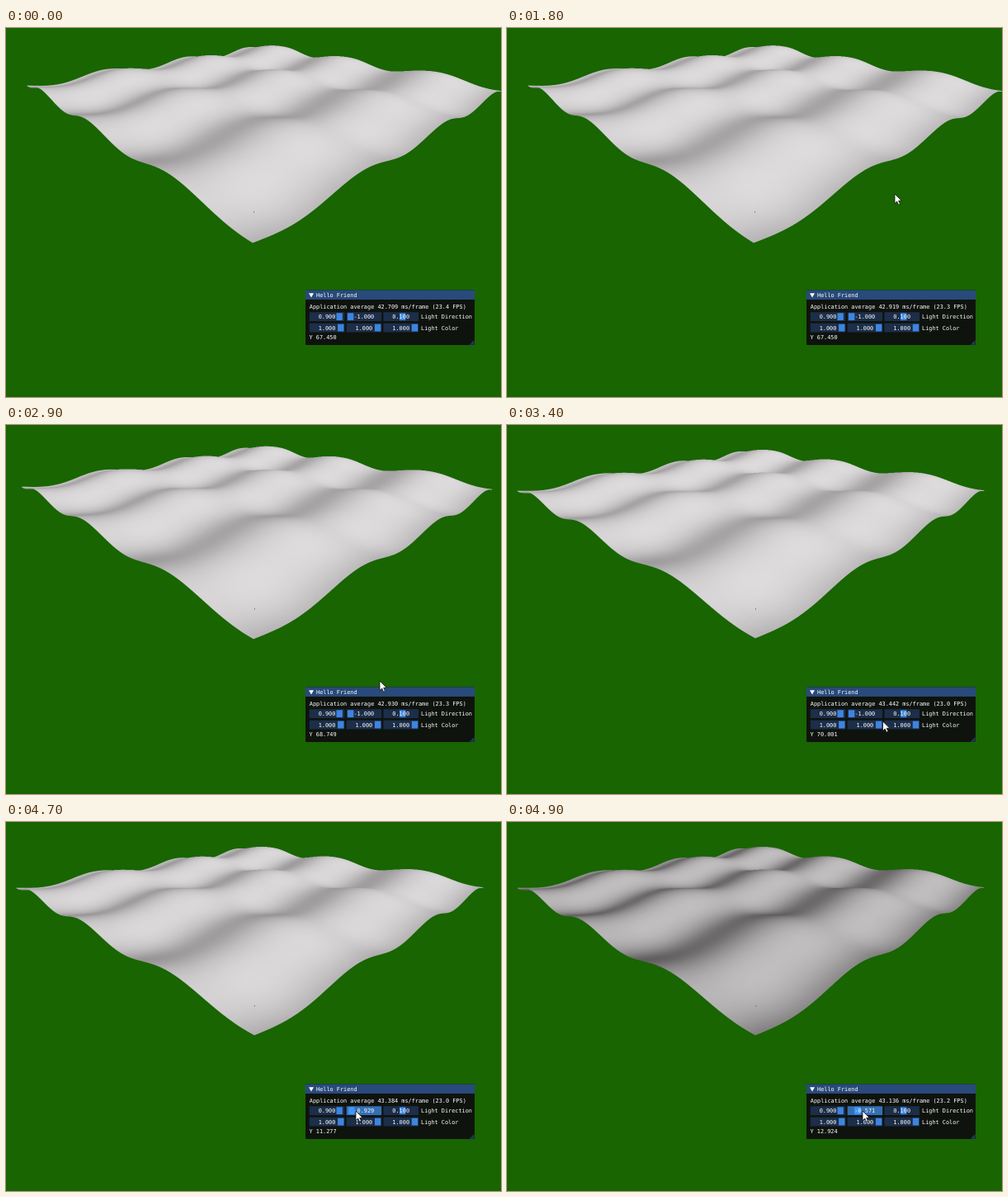
Animation of 600 by 447 pixels, one loop 5 s. Source, as an HTML page with a canvas:

```html
<!DOCTYPE html>
<html lang="en">
<head>
<meta charset="utf-8">
<title>Lit wave surface</title>
<style>
  html, body { margin: 0; width: 100%; height: 100%; overflow: hidden; background: #186501; }
  canvas, svg { position: absolute; left: 0; top: 0; width: 600px; height: 447px; }
  text { font: 6.86px "DejaVu Sans Mono", "Liberation Mono", monospace; fill: #fff; white-space: pre; }
  .mid { text-anchor: middle; }
</style>
</head>
<body>
<canvas id="scene" width="1200" height="894"></canvas>
<svg id="ui" viewBox="0 0 600 447">
  <rect x="363" y="317.5" width="205" height="66.5" rx="1" fill="#0f130e"/>
  <rect x="363" y="317.5" width="205" height="11.5" fill="#294a7a"/>
  <path d="M367 321.2h6l-3 5.2z" fill="#fff"/>
  <path d="M567.5 378v5.8h-5.8z" fill="#1d3a5e"/>
  <text x="376" y="326">Hello Friend</text>
  <text id="stats" x="367.8" y="340.2"></text>
  <g id="fields"></g>
  <text x="503" y="352.2">Light Direction</text>
  <text x="503" y="365.6">Light Color</text>
  <text id="height" x="367.5" y="377.3"></text>
  <path id="cursor" d="M0 0V11.6L2.7 9.1L4.5 13.2L6.5 12.3L4.7 8.3H8.3Z" fill="#fff" stroke="#111" stroke-width=".8"/>
</svg>
<script>
const LOOP = 5000, STEP = 100;
const FOCAL = 400, CX = 300, CY = 223;
const AMP = 0.042, SLOPE = 0.22;
const ROWS = 180, COLS = 110;
const DRAG_START = 3900;

// Screen corners of the surface before and after the camera rises
const BEFORE = { near: [299, 260.5], left: [26, 70], right: [600, 77] };
const AFTER = { near: [301, 258.5], left: [13, 80], right: [578, 80] };

// Pointer stops: time, x, y
const STOPS = [[1600, 588, 361], [1800, 470, 201], [2100, 526, 124], [2500, 453, 310],
               [2950, 453, 310], [3400, 455.5, 359], [3800, 424, 350]];

const $ = id => document.getElementById(id);
const ctx = $("scene").getContext("2d");
ctx.scale(2, 2);

const lerp = (a, b, k) => a + (b - a) * k;
const mix = (a, b, k) => a.map((v, i) => lerp(v, b[i], k));
const ramp = (t, from, to) => Math.min(1, Math.max(0, (t - from) / (to - from)));

const rise = t => ramp(t, 2690, 3102.4);
const lightY = t => -1 + 0.071 * ramp(t, 4000, 4700) + 0.358 * ramp(t, 4700, 4900);
const frameTime = t => 42.709 + 0.211 * (1 - Math.exp(-t / 360)) + 0.522 * ramp(t, 2890, 3400)
  - 0.058 * ramp(t, 3400, 4700) - 0.248 * ramp(t, 4700, 4900);

function pointer(t) {
  let pos = STOPS[0];
  for (const stop of STOPS) {
    const last = pos === STOPS[0] ? stop[0] : pos[0];
    if (t >= stop[0]) pos = stop;
    else return mix(pos, stop, ramp(t, last === stop[0] ? pos[0] : last, stop[0]));
  }
  return [t, lerp(pos[1], 431, ramp(t, 4700, 4900)), pos[2]];
}

function node(tag, attrs, parent) {
  const el = document.createElementNS("http://www.w3.org/2000/svg", tag);
  for (const k in attrs) el.setAttribute(k, attrs[k]);
  return parent.appendChild(el);
}

function slider(col, y, value) {
  const g = $("fields"), x = 367.8 + 44.85 * col;
  const box = node("rect", { x, y, width: 42.5, height: 10.8, fill: "#1c2e49" }, g);
  const grab = node("rect", { y: y + 1, width: 7.4, height: 8.8, fill: "#3d85e0" }, g);
  const label = node("text", { x: x + 21.2, y: y + 7.9, class: "mid" }, g);
  const set = v => {
    grab.setAttribute("x", x + 1.3 + (v + 1) / 2 * 33);
    label.textContent = v.toFixed(3);
  };
  set(value);
  return { box, grab, set };
}

const [, dragged] = [0.9, -1, 0.1].map((v, i) => slider(i, 344.3, v));
for (let i = 0; i < 3; i++) slider(i, 357.7, 1);

const waveU = u => 19.2 * u - 0.38;
const waveV = v => 6 * Math.PI * v;

// Recovers the camera from three corners of a square on the ground
function projector(near, left, right) {
  const slope = p => Math.abs((near[1] - p[1]) / (near[0] - p[0]));
  const m = 1 / (slope(left) * slope(right)) - 1, q = near[1] - CY;
  const drop = (Math.sqrt(q * q + m * (FOCAL * FOCAL + q * q)) - q) / m;
  const horizon = near[1] - drop;
  const tan = (CY - horizon) / FOCAL, cos = 1 / Math.hypot(1, tan), sin = tan * cos;
  const ground = ([x, y]) => {
    const z = FOCAL / cos / (y - horizon);
    return [(x - CX) * z / FOCAL, z];
  };
  const [n, l, r] = [near, left, right].map(ground);
  return (u, v) => {
    const [x, z] = n.map((a, i) => a + (l[i] - a) * u + (r[i] - a) * v);
    const h = AMP * (1 - Math.cos(waveU(u)) - Math.sin(waveV(v)));
    const depth = z - h * sin;
    const up = tan * z - 1 / cos + h * cos;
    return [CX + FOCAL * x / depth, CY - FOCAL * up / depth];
  };
}

function shade(u, v, ly) {
  const su = SLOPE * Math.sin(waveU(u)), sv = -SLOPE * Math.cos(waveV(v));
  const d = (0.9 * su - ly + 0.1 * sv) / Math.hypot(su, 1, sv) / Math.hypot(0.9, ly, 0.1);
  const c = 350 * d - 108 * d * d;
  return `rgb(${c | 0},${c - 3 | 0},${c - 1 | 0})`;
}

function drawSurface(k, ly) {
  const project = projector(...["near", "left", "right"].map(c => mix(BEFORE[c], AFTER[c], k)));
  const grid = [];
  for (let i = 0; i <= ROWS; i++) {
    grid.push([]);
    for (let j = 0; j <= COLS; j++) grid[i].push(project(i / ROWS, j / COLS));
  }
  ctx.fillStyle = "#186501";
  ctx.fillRect(0, 0, 600, 447);
  ctx.lineWidth = 0.8;
  ctx.lineJoin = "round";
  // Far cells first; the outline closes seams between cells
  for (let i = ROWS - 1; i >= 0; i--) {
    for (let j = COLS - 1; j >= 0; j--) {
      ctx.fillStyle = ctx.strokeStyle = shade((i + 0.5) / ROWS, (j + 0.5) / COLS, ly);
      ctx.beginPath();
      ctx.moveTo(...grid[i][j]);
      ctx.lineTo(...grid[i + 1][j]);
      ctx.lineTo(...grid[i + 1][j + 1]);
      ctx.lineTo(...grid[i][j + 1]);
      ctx.closePath();
      ctx.fill();
      ctx.stroke();
    }
  }
  ctx.fillStyle = "#77777a";
  ctx.fillRect(300 + Math.round(k), 222, 1, 1.5);
}

let lastSurface = "";

function render(t) {
  const k = rise(t), ly = lightY(t), key = k + "," + ly;
  if (key !== lastSurface) drawSurface(k, ly);
  lastSurface = key;

  const ms = frameTime(t);
  $("stats").textContent = `Application average ${ms.toFixed(3)} ms/frame (${(1000 / ms).toFixed(1)} FPS)`;

  const active = t >= DRAG_START;
  const y = active ? 10.9504 + 4.6006 * (ly + 1) : lerp(67.45, 70.001, k);
  $("height").textContent = "Y " + y.toFixed(3);
  dragged.set(ly);
  dragged.box.setAttribute("fill", active ? "#3470b4" : "#1c2e49");
  dragged.grab.setAttribute("fill", active ? "#4296fa" : "#3d85e0");

  const [, px, py] = pointer(t);
  $("cursor").setAttribute("visibility", t < STOPS[0][0] ? "hidden" : "visible");
  $("cursor").setAttribute("transform", `translate(${px} ${py})`);
}

const start = performance.now();
let lastTime = -1;

function tick() {
  const t = Math.floor(((performance.now() - start) % LOOP) / STEP) * STEP;
  if (t !== lastTime) render(t);
  lastTime = t;
  requestAnimationFrame(tick);
}
tick();
</script>
</body>
</html>
```
